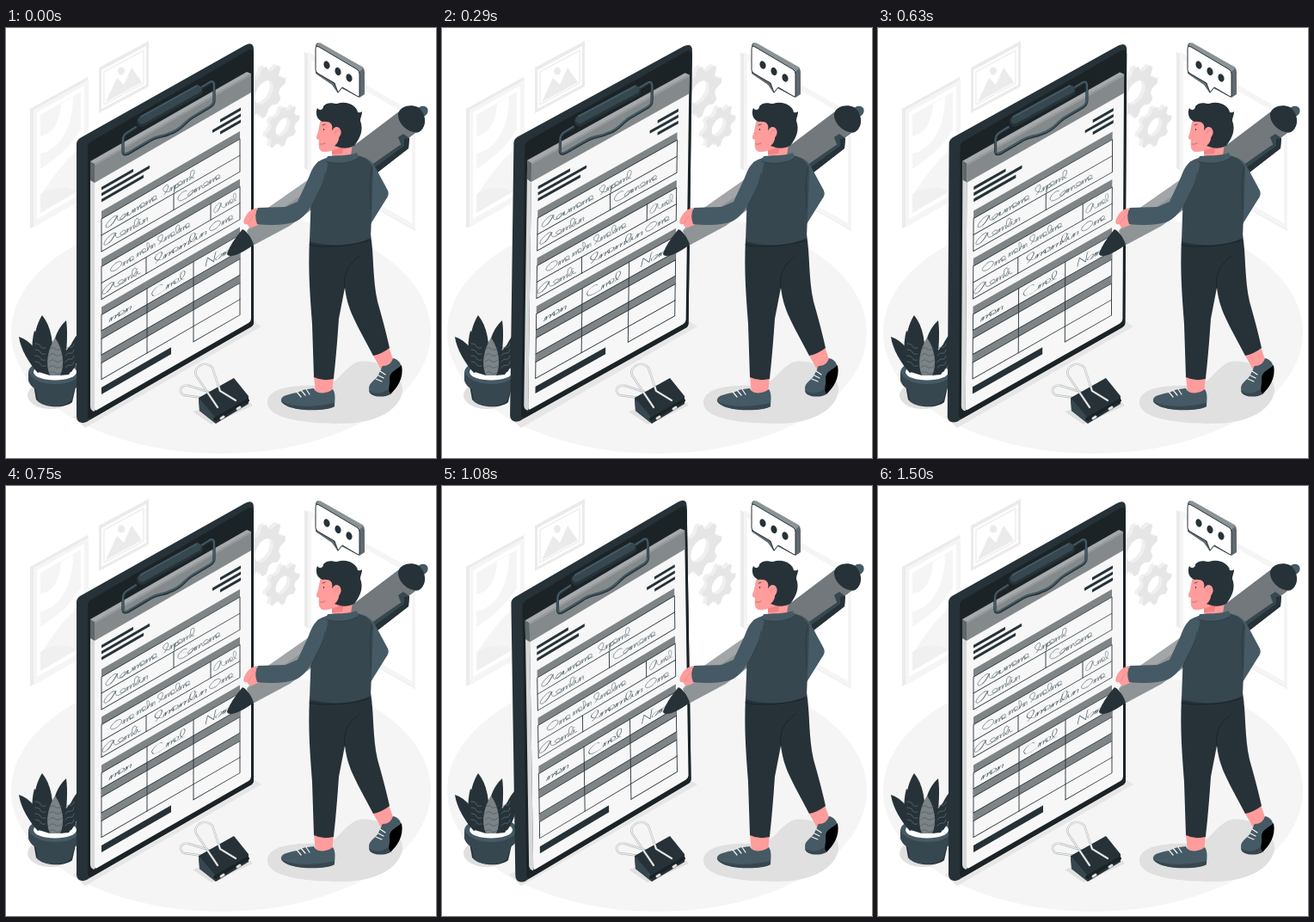
Recreate the animation shown at these times as an HTML page with a canvas. Size 500 px wide and 500 px high, loop 1.54 s.

```html
<!DOCTYPE html>
<html lang="en">
<head>
<meta charset="utf-8">
<title>Filling in a form</title>
<style>
html, body { margin: 0; width: 100%; height: 100%; overflow: hidden; background: #fff; }
canvas { display: block; width: 500px; height: 500px; }
</style>
</head>
<body>
<canvas id="stage"></canvas>
<script>
const canvas = document.getElementById('stage');
const ctx = canvas.getContext('2d');
const ratio = window.devicePixelRatio || 1;
canvas.width = canvas.height = 500 * ratio;

const INK = '#263238', DARK = '#1b2327', SLATE = '#37474f', STEEL = '#455a64';
const SKIN = '#ff9c9c', GRAY = '#7f8487';
const SLOPE = 0.577;
const LOOP = 1540, CYCLE = 1500, STEP = 1000 / 24;

function fill(color, d) {
  ctx.fillStyle = color;
  ctx.fill(new Path2D(d));
}
function line(color, width, d) {
  ctx.strokeStyle = color;
  ctx.lineWidth = width;
  ctx.lineCap = ctx.lineJoin = 'round';
  ctx.stroke(new Path2D(d));
}
function oval(color, x, y, rx, ry, turn = 0) {
  ctx.fillStyle = color;
  ctx.beginPath();
  ctx.ellipse(x, y, rx, ry, turn, 0, 7);
  ctx.fill();
}
function rect(color, x, y, w, h) {
  ctx.fillStyle = color;
  ctx.fillRect(x, y, w, h);
}
function within(draw, ...matrix) {
  ctx.save();
  ctx.transform(...matrix);
  draw();
  ctx.restore();
}

function gear(x, y, radius, teeth) {
  let d = '';
  for (let i = 0; i < teeth * 4; i++) {
    const a = (i - 0.5) / (teeth * 4) * Math.PI * 2;
    const r = radius * (i % 4 < 2 ? 1 : 0.77);
    d += (i ? 'L' : 'M') + r * Math.cos(a) + ',' + r * Math.sin(a);
  }
  const hole = radius * 0.43;
  d += `ZM${hole},0A${hole},${hole} 0 1 0 ${-hole},0A${hole},${hole} 0 1 0 ${hole},0Z`;
  const layer = (color, dx, dy) => within(() => {
    ctx.fillStyle = color;
    ctx.fill(new Path2D(d), 'evenodd');
  }, 0.866, -0.5, 0, 1, x + dx, y + dy);
  layer('#f0f0f0', -4, -2);
  layer('#e6e6e6', 0, 0);
}

function room() {
  oval('#f5f5f5', 250, 354, 244, 141);

  fill('#ebebeb', 'M28,94L95,57V195L28,233Z');
  fill('#f5f5f5', 'M32,95L96,60V195L32,232Z');
  fill('#fff', 'M36,98L91,67V191L36,222Z');
  fill('#f5f5f5', 'M40,101L87,74V188L40,215Z');
  fill('#fff', 'M40,126C58,122 63,104 64,88L78,80C78,118 61,142 40,146ZM40,164C62,150 77,135 87,118V139C72,150 58,168 40,195Z');
  fill('#f0f0f0', 'M40,193C57,183 72,184 82,190L40,215Z');

  fill('#ebebeb', 'M108,46L166,15V68L108,99Z');
  fill('#fff', 'M111,49L163,21V66L111,94Z');
  line('#f0f0f0', 1.5, 'M114,51L160,26V64L114,89Z');
  fill('#ebebeb', 'M116,86L129,58L137,66L146,46L158,63Z');
  oval('#ebebeb', 134, 50, 4, 4.5);

  fill('#ebebeb', 'M347,28L476,101V236L347,163Z');
  fill('#f5f5f5', 'M351,28L476,99V235L351,165Z');
  fill('#fff', 'M355,37L472,104V227L355,160Z');

  gear(300, 75, 29, 8);
  gear(322, 115, 22.5, 8);
}

function floorShadows() {
  fill('#e6e6e6', 'M78,452L92,465L297,347L286,340Z');
  oval('#e0e0e0', 52, 427, 27, 16);
  fill('#e0e0e0', 'M217,446L239,461L287,439L276,427Z');
  fill('#e0e0e0', 'M304,434C306,419 332,415 361,416C386,418 389,398 407,389C430,382 464,402 461,423C456,448 424,460 390,460C350,460 302,455 304,434Z');
}

function plant() {
  fill(INK, 'M30,404L35,432C44,443 70,442 77,435L84,404Z');
  fill(SLATE, 'M33,412L37,434C47,442 69,441 76,433L82,412Z');
  oval(STEEL, 57, 400, 31, 14);
  fill(SLATE, 'M26,400V410C32,430 81,431 88,410V400C80,419 36,420 26,400Z');
  oval('#fff', 57, 400, 25, 9.5);
  fill(INK, 'M37,401C27,390 17,374 15,359C28,363 39,377 48,396Z');
  fill(INK, 'M67,402C69,378 77,361 88,351C89,371 85,388 76,400Z');
  fill(INK, 'M37,395C28,374 33,348 42,334C53,347 55,367 55,388Z');
  fill(INK, 'M55,381C53,362 62,347 70,340C72,353 71,374 68,391Z');
  fill(INK, 'M38,400C29,385 29,367 33,352C46,364 52,381 51,404Z');
  fill(INK, 'M63,404C63,384 70,370 82,364C84,380 78,396 73,403Z');
  fill('#7b8387', 'M51,404C45,390 49,373 57,360C66,373 69,391 63,404Z');
  for (let y = 371; y < 400; y += 7) line(STEEL, 0.7, `M50,${y + 3}q4,-4 7,-1t8,-1`);
  for (let y = 367; y < 395; y += 7) {
    line('#64747c', 0.7, `M34,${y}q5,0 6,3t6,2`);
    line('#64747c', 0.7, `M69,${y + 7}q3,-4 6,-3t4,-4`);
  }
}

// Joined-up letters: each starts and ends on the baseline.
const LETTERS = {
  a: 'c4,-5 3,-6 1,-5c-4,2 -3,7 1,4l2,-4l-1,5',
  e: 'c4,-2 4,-6 2,-6c-3,0 -3,6 1,6',
  h: 'c5,-4 5,-12 3,-12l-2,12c2,-6 5,-6 3,0',
  i: 'l2,-5c-1,4 -1,5 1,5m-.5,-8l.3,-.3m.2,8.3',
  l: 'c5,-4 6,-12 4,-12c-2,0 -4,12 -1,12',
  m: 'c1,-3 1,-5 2,-5l-1,5c1,-4 3,-6 3,-4l-1,4c1,-4 3,-6 3,-4l-1,4',
  n: 'c1,-3 1,-5 2,-5l-1,5c1,-4 3,-6 3,-4l-1,4',
  p: 'l2,-5l-3,10l2,-9c4,-3 4,4 0,4l2,0',
  r: 'l2,-5l1,1c-1,3 -1,4 1,4',
  u: 'l1.5,-5c-2,5 0,7 2,3l1,-3l-.5,5',
  A: 'c8,-9 6,-13 1,-9c-6,5 -5,13 1,7l4,-7c-2,7 -1,9 2,9',
  C: 'm6,-9c0,-5 -8,0 -7,6c0,5 5,4 8,3',
  I: 'c3,-3 6,-11 4,-12c-4,0 -5,8 0,12',
  N: 'l3,-11l2,11l3,-12l1,0m-1,12',
  O: 'm3,-10c-7,3 -6,11 -1,10c6,-3 5,-11 1,-10m3,10'
};

function script(word, x, y, size = 1) {
  const d = 'M0,0' + [...word].map(c => LETTERS[c]).join('');
  within(() => line(STEEL, 0.42, d), 1.65 * size, 0, 0.3, 0.8, x - 111, y);
}

function sheet() {
  // Skewed space: x runs along the sheet from its left margin, y is straight down.
  const rule = (x1, x2, y) => line(INK, 0.9, `M${x1},${y}H${x2}`);
  const post = (x, y1, y2) => line(INK, 0.9, `M${x},${y1}V${y2}`);
  const band = (y, h = 9) => rect(GRAY, 0, y, 161, h);
  const box = (y, h) => line(INK, 0.9, `M0,${y}H161V${y + h}H0Z`);

  rect('#84898b', -8, 153.5, 182, 22);
  rect('#979b9d', -8, 153.5, 182, 2);

  [[37, 185], [56, 192], [49, 199]].forEach(([w, y]) => rect(INK, 0, y, w, 3.6));
  [[138, 186], [129, 193], [138, 200]].forEach(([x, y]) => rect(INK, x, y, 162 - x, 3.4));

  band(213);
  box(222, 38);
  rule(0, 161, 241);
  post(84, 241, 260);

  band(268.5);
  box(277.5, 38);
  rule(0, 161, 296.5);
  post(127, 277.5, 296.5);
  post(52, 296.5, 315.5);

  band(324.5);
  box(333.5, 75);
  band(352, 9.5);
  band(380, 9.5);
  [352, 361.5, 380, 389.5].forEach(y => rule(0, 161, y));
  post(53, 333.5, 408.5);
  post(107, 333.5, 426.5);
  line(INK, 0.9, 'M107,426.5H161V408');
  rect(INK, 0, 418, 81, 8);

  script('Aaumeme', 122, 236, 1.05);
  script('Inpeml', 184, 236);
  script('Aemlin', 120, 255, 1.07);
  script('Canreme', 203, 254);
  script('Ome', 126, 291);
  script('mehn', 152, 290, 0.85);
  script('Imelme', 178, 290, 0.95);
  script('Amel', 246, 291, 0.7);
  script('Aemli', 118, 311, 1.05);
  script('Imemlin', 174, 310, 1.35);
  script('Ome', 241, 310);
  script('men', 120, 347, 1.35);
  script('Cmel', 173, 347, 1.15);
  script('Nan', 232, 347, 1.15);
}

function board() {
  fill(INK, 'M82,135Q82,131 86,128L278,20Q288,15 288,25V342Q288,346 284,348L97,456Q91,461 85,458Q82,456 82,451Z');
  fill(DARK, 'M95,139Q95,135 99,132L281,26Q288,23 288,30V342Q288,346 284,348L100,454Q95,456 95,450Z');
  fill('#d5d8d9', 'M98,155L103,158V446Q98,445 98,440Z');
  fill('#f7f7f7', 'M103,158L285,53V338Q285,341 282,343L106,444Q103,446 103,443Z');
  fill('#5f676b', 'M98,155L103,158V180L98,177Z');
  fill('#a6aaac', 'M98,155L280,51L285,53L103,158Z');
  within(sheet, 1, -SLOPE, 0, 1, 111, 0);

  line(INK, 3.2, 'M151,116L140,123Q136,126 136,131V143Q136,149 142,146L164,133C175,125 183,127 190,123C204,119 207,110 217,104L237,92Q242,89 242,84V68Q242,60 235,65L227,70');
  line(STEEL, 2, 'M151,115L140,122Q136,125 136,130V142Q136,148 142,145L164,132C175,124 183,126 190,122C204,118 207,109 217,103L237,91Q242,88 242,83V67Q242,59 235,64L227,69');
  line(INK, 12, 'M158,109L223,73');
  line(SLATE, 9, 'M158,107L223,71');
  line(STEEL, 2, 'M157,103L222,67');
}

function wire(d) {
  line('#b5b9bb', 2.4, d);
  line('#f5f5f5', 1.2, d);
}

function binderClip() {
  wire('M229,430L207,427C199,422 204,414 213,416L238,424');
  fill(INK, 'M224,430L265,407L282,428V437L244,460L225,445Z');
  fill(SLATE, 'M224,430L242,451L244,460L225,445Z');
  line(DARK, 4, 'M243,455L281,433');
  wire('M246,441L221,404C217,393 233,386 240,395L249,422L267,433');
  line('#e0e0e0', 3, 'M250,454L253,452M269,443L272,441');
}

function bubble() {
  const face = 'M360,24Q360,20 364,22L408,48Q411,50 411,53V78Q411,81 408,79L391,69L386,75L382,64L363,53Q360,51 360,49Z';
  fill('#5f696e', 'M360,20Q361,16 365,18L415,46Q417,48 417,51V77L411,81L390,70L386,76L379,66L360,53Z');
  fill('#8b9396', 'M361,20L365,17L416,46L411,51Z');
  fill('#fff', face);
  line(INK, 1, face);
  [[373, 43], [386, 50.5], [399, 58]].forEach(([x, y]) => oval(INK, x, y, 3.4, 4.8, -0.35));
}

function pen() {
  fill('#8f9497', 'M280,236L296,216L350,178L456,98L476,122L330,230L287,253Z');
  fill('#72787b', 'M390,148L456,98L476,122L400,179Z');
  fill('#a2a6a8', 'M280,236L296,215L352,176L356,186L294,228Z');
  fill(INK, 'M257,262Q262,249 275,234C281,237 286,245 288,252Q270,265 261,265Q257,265 257,262Z');
  fill(SLATE, 'M424,160L459,135L456,127L462,123L469,128L468,140L428,171Z');
  fill(INK, 'M426,164L463,137V129L469,128L468,140L428,171Z');
  oval(STEEL, 484, 97, 7, 6, -0.6);
  fill(INK, 'M456,99C459,91 470,88 479,92C486,97 489,107 486,114C483,121 478,123 474,121C464,119 455,109 456,99Z');
}

function legs() {
  fill(SKIN, 'M358,405H381L379,426L360,425Z');
  fill(SKIN, 'M426,379L445,371L451,388L436,397Z');
  fill(INK, 'M353,245C351,285 354,315 356,344L358,406Q368,411 381,408C384,382 386,353 387,338L394,302C397,326 405,338 411,351L427,381Q437,379 446,372C441,349 435,329 432,318C426,291 428,264 424,240Z');
  line('#1a2327', 1, 'M394,302C392,286 397,276 411,265M353,252C364,256 402,254 422,247');

  fill(STEEL, 'M320,434C319,426 332,426 341,423C349,419 352,420 358,419C360,426 373,426 380,420C384,426 382,434 382,440C370,446 327,446 320,434Z');
  fill(SLATE, 'M320,434C334,442 361,441 382,436V440C370,447 326,446 320,434Z');
  line('#f5f5f5', 1.2, 'M338,423L343,429M343,421L348,427M349,420L353,426');

  fill(STEEL, 'M422,419C422,411 432,409 434,401C437,397 436,395 438,393C444,393 448,390 450,384C456,385 460,390 460,397C460,410 452,415 448,422C440,430 422,430 422,419Z');
  fill('#000', 'M460,392C463,407 455,418 447,426C443,421 447,416 446,408C446,399 454,398 460,392Z');
  fill(SLATE, 'M422,421C429,427 438,425 444,420L447,426C440,430 422,430 422,421Z');
  line('#f5f5f5', 1.2, 'M430,408L437,411M433,404L439,407M435,399L441,403');
}

function torso() {
  fill(STEEL, 'M404,148C420,149 426,155 430,163L444,189Q446,194 442,199L424,228L415,190Z');
  fill(SLATE, 'M362,156L375,150C385,155 397,153 407,148C419,150 425,156 427,165L424,244C403,255 371,254 353,248L355,190Z');
  line('#2c3a41', 1, 'M426,161C421,178 424,194 424,210');
  fill(SKIN, 'M292,209C283,211 280,216 277,222C275,228 278,229 281,228C281,233 287,233 294,228Z');
  line('#e98383', 0.7, 'M281,228L287,219');
  fill(STEEL, 'M375,151C362,153 357,160 352,174L339,202L325,208L293,209Q288,217 292,228C311,230 326,229 337,225C346,221 353,211 357,203L370,177C373,165 375,157 375,151Z');
  line('#31424a', 0.9, 'M371,169C369,185 358,201 354,211');
}

function head() {
  fill(SKIN, 'M379,132L404,126L401,149C393,153 383,152 379,148Z');
  fill('#f28282', 'M379,142C388,141 391,137 394,132L391,146L379,147Z');
  fill(SKIN, 'M369,103C363,109 365,118 361,126Q360,129 364,130C363,138 364,143 369,144C378,145 388,139 390,132L394,106Z');
  fill(INK, 'M368,109C360,106 360,97 362,93C365,97 369,95 369,91C374,85 381,88 385,88C397,84 408,91 409,98Q412,99 414,97C414,102 412,104 412,108C416,118 412,128 405,137C396,141 390,140 382,137C386,134 388,129 387,123L379,119C381,111 376,108 368,109Z');
  oval(SKIN, 384, 122, 5.5, 7, 0.25);
  line('#e98383', 0.8, 'M382,124Q382,118 387,119');
  line(INK, 0.7, 'M368,113L371,112');
  oval(INK, 369.5, 118, 0.6, 1);
  line('#b85f65', 0.7, 'M365,135Q368,136 371,134');
  fill(STEEL, 'M374,149C383,148 398,149 408,145L410,151C401,158 383,159 372,155Z');
  line('#2c3a41', 0.8, 'M372,155C383,159 401,158 410,151');
}

// Sway: 0 → 1° → -1° → 0, straight-line between quarter marks.
function sway(time) {
  const t = Math.floor((time % LOOP + 4) / STEP) * STEP;
  const p = (t / CYCLE) % 1;
  const degrees = p < 0.25 ? p * 4 : p < 0.75 ? 2 - p * 4 : p * 4 - 4;
  return degrees * Math.PI / 180;
}

function draw(time) {
  ctx.setTransform(ratio, 0, 0, ratio, 0, 0);
  rect('#fff', 0, 0, 500, 500);
  room();
  floorShadows();
  plant();

  ctx.save();
  ctx.translate(185, 238.5);
  ctx.rotate(sway(time));
  ctx.translate(-185, -238.5);
  board();
  ctx.restore();

  binderClip();
  bubble();
  pen();
  legs();
  torso();
  head();
}

let start;
function tick(now) {
  start ??= now;
  draw(now - start);
  requestAnimationFrame(tick);
}
draw(0);
requestAnimationFrame(tick);
</script>
</body>
</html>
```
